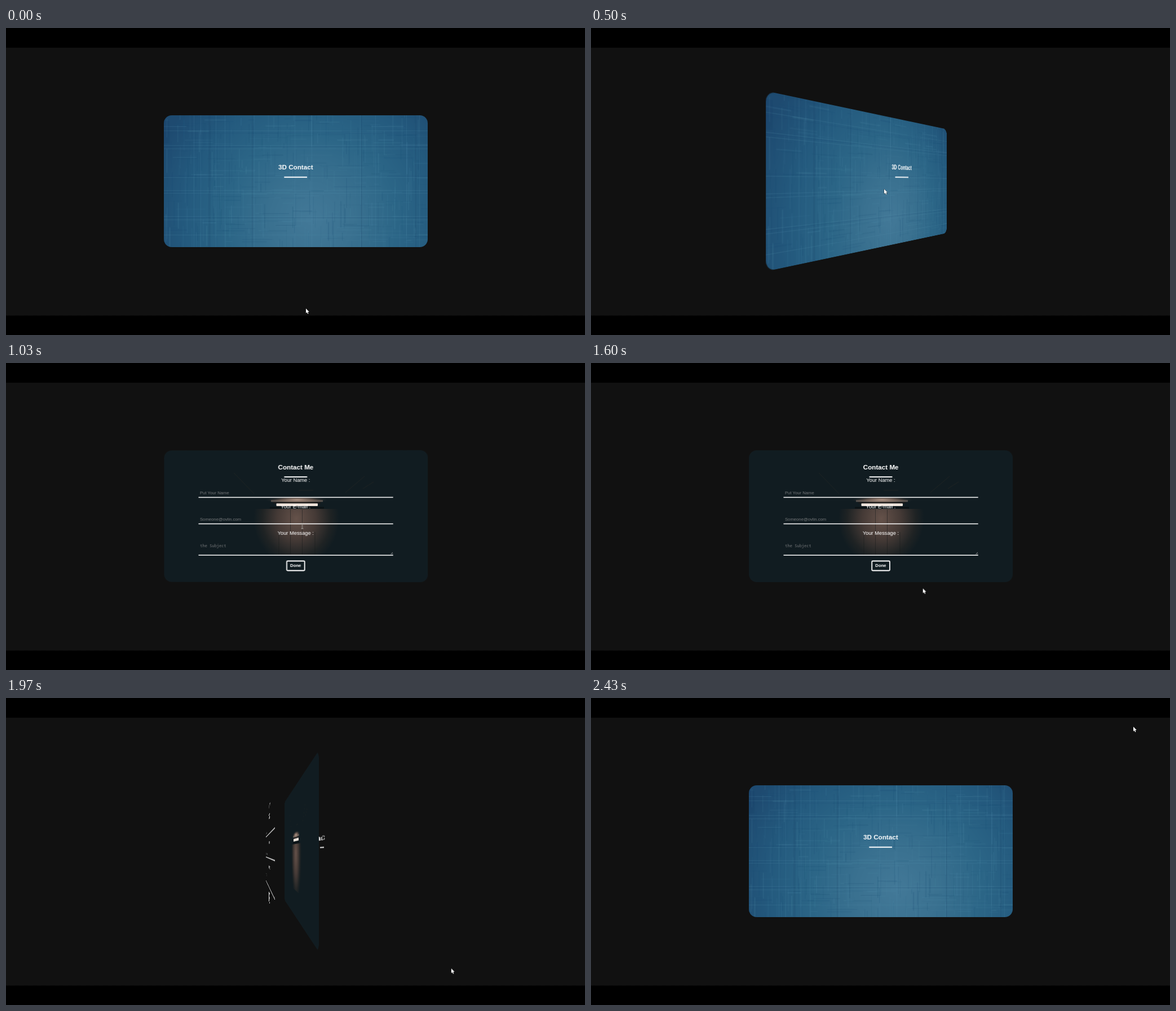
An HTML page with a canvas that plays this animation: 1027x545 px, repeating every 2460 ms.

```html
<!DOCTYPE html>
<html lang="en">
<head>
<meta charset="utf-8">
<title>3D contact card</title>
<style>
  html, body { margin: 0; width: 100%; height: 100%; overflow: hidden; background: #000; }
  .stage {
    position: relative; width: 1027px; height: 545px; overflow: hidden;
    background: linear-gradient(#111, #111) 0 35px / 100% 475.5px no-repeat #000;
  }
  .scene {
    position: absolute; left: 280px; top: 155px; width: 468px; height: 234px;
    perspective: 669px;
  }
  .card, .card > * { position: absolute; left: 0; top: 0; width: 100%; height: 100%; }
  .card { transform-style: preserve-3d; animation: flip 2460ms infinite; }
  .plane { border-radius: 14px; backface-visibility: hidden; }
  .wall { transform: rotateY(180deg); overflow: hidden; }

  /* The scale cancels the perspective, so the flat pose keeps its size. */
  .title { transform: translateZ(46.8px) scale(.93); overflow: visible; }
  .form { transform: rotateY(180deg) translateZ(46.8px) scale(.93); overflow: visible; }

  text { font-family: "Liberation Sans", Arial, sans-serif; fill: #fff; }
  .head { font-size: 11.65px; font-weight: bold; text-anchor: middle; }
  .label { font-size: 9.3px; text-anchor: middle; }
  .hint { font-size: 7.7px; fill: #737678; }
  .mono { font-family: "Noto Sans Mono", "DejaVu Sans Mono", monospace; font-size: 7.05px; }
  .button { font-size: 7.7px; font-weight: bold; text-anchor: middle; }

  .cursor {
    position: absolute; left: 0; top: 0; width: 12px; height: 14px; overflow: visible;
    animation: move 2460ms linear infinite;
  }
  .arrow { animation: arrow 2460ms step-end infinite; }
  .beam { animation: beam 2460ms step-end infinite; }

  @keyframes flip {
    0% { transform: rotateY(0deg); }
    7.236% { transform: rotateY(0deg); animation-timing-function: ease-in-out; }
    43.008% { transform: rotateY(180deg); }
    64.553% { transform: rotateY(180deg); animation-timing-function: ease-in-out; }
    97.073%, 100% { transform: rotateY(0deg); }
  }
  @keyframes move {
    0%, 1.2% { transform: translate(532px, 498px); }
    7.24% { transform: translate(528px, 392px); }
    16.26% { transform: translate(521px, 293px); }
    20.33%, 30.08% { transform: translate(520px, 286px); }
    33.74%, 55.5% { transform: translate(525.5px, 289.5px); }
    65.04% { transform: translate(588px, 400px); }
    76.02% { transform: translate(786px, 478px); }
    80.08% { transform: translate(789.5px, 480px); }
    83.74% { transform: translate(814px, 494px); }
    97.56% { transform: translate(961.5px, 68px); }
    98.78%, 100% { transform: translate(962px, 51px); }
  }
  @keyframes arrow { 0%, 58.5% { opacity: 1; } 33% { opacity: 0; } 100% { opacity: 1; } }
  @keyframes beam { 0%, 58.5% { opacity: 0; } 33% { opacity: 1; } 100% { opacity: 0; } }
</style>
</head>
<body>
<div class="stage">
  <div class="scene">
    <div class="card">
      <canvas class="plane" id="cloth" width="936" height="468"></canvas>

      <svg class="plane wall" viewBox="280 155 468 234">
        <defs>
          <radialGradient id="lit" gradientUnits="userSpaceOnUse" cx="0" cy="0" r="1"
            gradientTransform="translate(515 276) scale(76 84)">
            <stop offset="0" stop-color="#65524a"/>
            <stop offset=".45" stop-color="#453a36"/>
            <stop offset=".8" stop-color="#1f2324"/>
            <stop offset="1" stop-color="#111c21"/>
          </radialGradient>
          <radialGradient id="glow">
            <stop offset="0" stop-color="#b89c8c"/>
            <stop offset=".5" stop-color="#6b584f" stop-opacity=".8"/>
            <stop offset="1" stop-color="#111c21" stop-opacity="0"/>
          </radialGradient>
        </defs>
        <rect x="280" y="155" width="468" height="234" fill="#111c21"/>
        <rect x="439" y="259" width="153" height="83" fill="url(#lit)"/>
        <path d="M504.5 260V342M525.500 260V342M484 300V342M548 300V342"
          stroke="#171a1b" stroke-width="1" opacity=".5"/>
        <ellipse cx="516" cy="243" rx="58" ry="7" fill="url(#glow)"/>
        <path d="M470 245H562" stroke="#a38b7d" stroke-width="3" opacity=".45"/>
        <path d="M474 248.300H558" stroke="#1b1715" stroke-width="1.500"/>
        <rect x="479.500" y="249.300" width="73.500" height="4.700" rx="1" fill="#efe3da"/>
        <path d="M468 257H564" stroke="#0c1215" stroke-width="3"/>
        <path d="M602 230L636 201M633 223L652 211M440 232L404 195M519 226H545"
          fill="none" stroke="#2a2a26" stroke-width=".8" opacity=".7"/>
      </svg>

      <svg class="title" viewBox="280 155 468 234">
        <text class="head" x="513.8" y="251.200">3D Contact</text>
        <path d="M493.300 264.700H534" stroke="#fff" stroke-width="1.900"/>
      </svg>

      <svg class="form" viewBox="280 155 468 234">
        <text class="head" x="514.2" y="189">Contact Me</text>
        <path d="M493.700 202.200H534.500" stroke="#fff" stroke-width="1.900"/>
        <text class="label" x="514" y="210.600">Your Name :</text>
        <text class="label" x="514" y="257.600">Your E-mail :</text>
        <text class="label" x="514" y="304.700">Your Message :</text>
        <text class="hint" x="344" y="232.800">Put Your Name</text>
        <text class="hint" x="344" y="279.700">Someone@ovlin.com</text>
        <text class="hint mono" x="344.3" y="327">the Subject</text>
        <path d="M341.500 238.500H686.700M341.500 285.500H686.700M341.500 341.200H686.700"
          stroke="#fff" stroke-width="1.400"/>
        <path d="M682.500 339.500L686 336M684.700 339.700L686.200 338.200" stroke="#c8c8c8" stroke-width=".7"/>
        <rect x="498.300" y="351.500" width="31.700" height="17" rx="1.500"
          fill="none" stroke="#fff" stroke-width="1.800"/>
        <text class="button" x="514" y="362.300">Done</text>
      </svg>
    </div>
  </div>

  <svg class="cursor" viewBox="0 0 12 14">
    <path class="arrow" d="M0 0V8.300L1.900 6.600L3.100 9.500L4.500 8.900L3.300 6.100H5.800Z"
      fill="#fff" stroke="#111" stroke-width=".7" paint-order="stroke"/>
    <path class="beam" d="M-1.800 -4.500H1.800M0 -4.500V4.500M-1.800 4.500H1.800"
      fill="none" stroke="#c4beb8" stroke-width=".9"/>
  </svg>
</div>

<script>
  const ctx = document.getElementById('cloth').getContext('2d');
  const W = 468, H = 234;
  let seed = 7;
  const rand = () => (seed = (seed * 16807) % 2147483647) / 2147483647;

  const strip = (x, y, w, h, color, alpha) => {
    ctx.globalAlpha = alpha;
    ctx.fillStyle = color;
    ctx.fillRect(x, y, w, h);
  };

  ctx.scale(2, 2);
  const shade = ctx.createRadialGradient(262, 185, 0, 262, 185, 300);
  [[0, '#437998'], [.25, '#3a7190'], [.5, '#2c6687'], [.75, '#245a7e'], [1, '#1e4a70']]
    .forEach(([at, color]) => shade.addColorStop(at, color));
  strip(0, 0, W, H, shade, 1);

  // Short woven threads in both directions
  for (let i = 0; i < 520; i++) {
    const upright = rand() < .6;
    const length = 8 + rand() * 50, width = .7 + rand() * 1.8;
    const x = rand() * W - 8, y = rand() * H - 8;
    const color = rand() < .5 ? '#164a70' : '#4b88a4';
    strip(x, y, upright ? width : length, upright ? length : width, color, .06 + rand() * .13);
  }

  // Long threads across the whole cloth
  [53, 65, 92, 108, 160, 232, 262, 348, 375, 430, 453]
    .forEach(x => strip(x, 0, 1, H, '#5490ab', .16));
  [79, 81, 156, 350, 446].forEach(x => strip(x, 0, 1.5, H, '#173f66', .22));
  [27, 53, 59, 110, 133, 138, 179, 185, 212]
    .forEach(y => strip(0, y, W, 1, '#5490ab', .18));
  [31, 55, 107, 181].forEach(y => strip(0, y, W, 1.2, '#1a486e', .16));
  strip(0, 10, 10, 40, '#173f66', .2);
</script>
</body>
</html>
```
